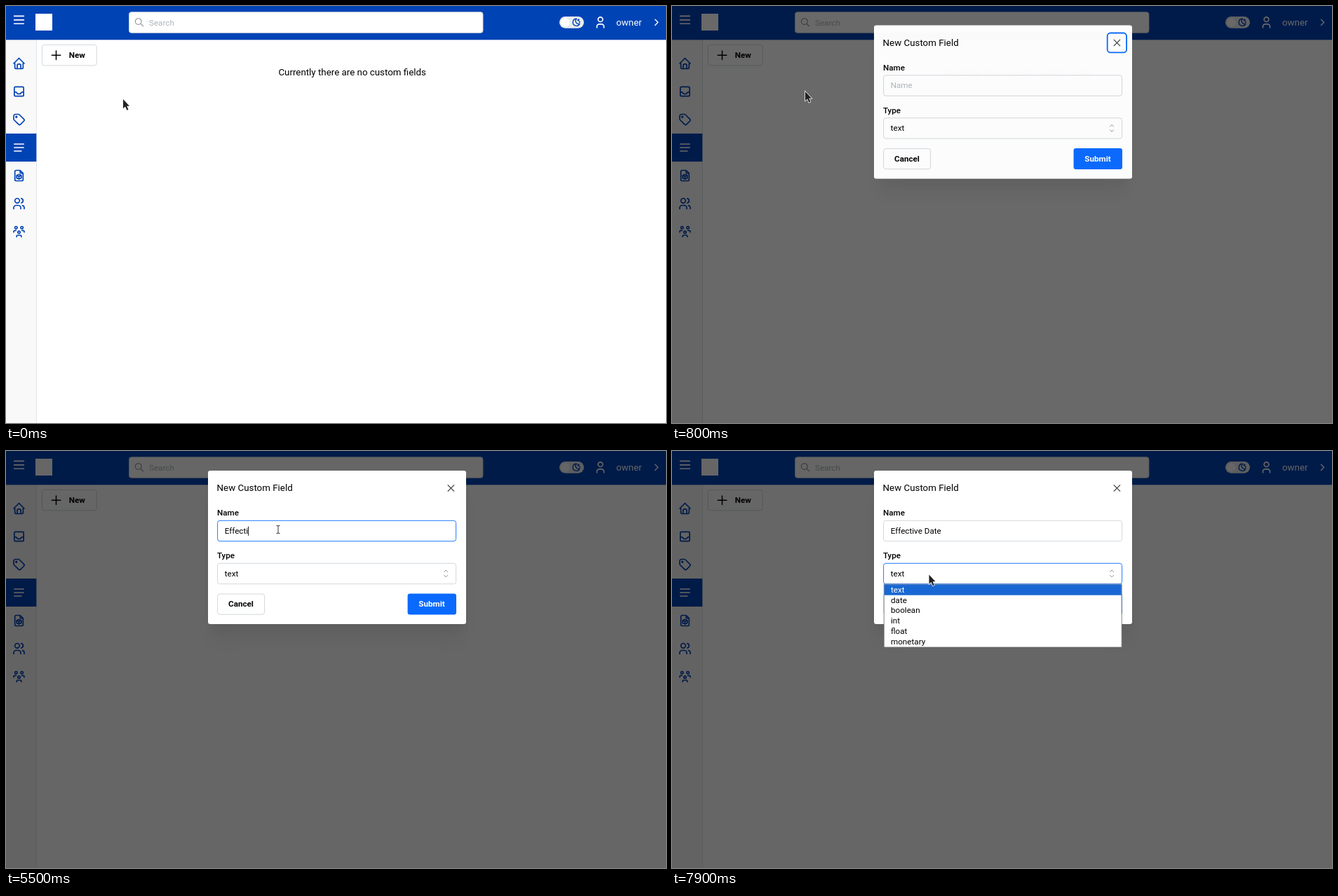
Animation, 941 px wide and 595 px high, one loop 8000 ms. Source, as an HTML page:

```html
<!DOCTYPE html>
<html lang="en">
<head>
<meta charset="utf-8">
<title>New custom field</title>
<style>
  html, body { margin: 0; width: 100%; height: 100%; overflow: hidden; background: #fff; }
  #stage { position: relative; width: 941px; height: 595px; overflow: hidden; }
  #stage > * { position: absolute; left: 0; top: 0; }
  svg { display: block; overflow: visible; font: 11.667px Roboto, sans-serif; }
  text { white-space: pre; }
  .big { font-size: 13.333px; }
  .label { font-weight: 500; }
  .bold { font-weight: 600; }
  .hint { fill: #adb5bd; }
  .center { text-anchor: middle; }
  .box { fill: #fff; stroke: #ced4da; stroke-width: .9; }
  .ring { fill: none; stroke: #0a6aff; stroke-width: 1.8; }
  .icon { fill: none; stroke: #0043b5; stroke-width: 2; stroke-linecap: round; stroke-linejoin: round; }
  .icon.white { stroke: #fff; }
  #overlay { width: 941px; height: 595px; background: #000; }
  #stage > #modal {
    left: 288px; top: 28.3px; width: 367.5px; height: 218.5px; border-radius: 3.3px; background: #fff;
    box-shadow: 0 1px 2.5px rgba(0,0,0,.05), 0 30px 23px -6px rgba(0,0,0,.05), 0 14px 14px -6px rgba(0,0,0,.04);
  }
</style>
</head>
<body>
<div id="stage">
  <svg width="941" height="595">
    <rect y="48" width="43" height="547" fill="#f9f9f9"/>
    <path d="M43.5 48V595" stroke="#dee2e6" stroke-width=".9"/>
    <rect width="941" height="48.3" fill="#0043b5"/>
    <rect y="182" width="43.3" height="40" fill="#0043b5"/>
    <path d="M11 14.4h15M11 19.9h15M11 25.3h15" stroke="#fff" stroke-width="1.6"/>
    <rect x="42" y="11" width="24" height="24" fill="#fff"/>
    <rect class="box" x="175.5" y="8.7" width="504.5" height="29.6" rx="3.3"/>
    <text class="hint" x="204" y="27.5">Search</text>
    <rect x="789" y="15" width="35" height="16.7" rx="8.35" fill="#e9ecef"/>
    <circle cx="797.5" cy="23.3" r="6.2" fill="#fff"/>
    <text class="big" x="870" y="27.8" fill="#fff">owner</text>
    <g id="icons"></g>
    <rect id="newButton" class="box" x="51.4" y="55.4" width="77.8" height="29.5" rx="3.3"/>
    <rect id="newRing" class="ring" x="49.3" y="53" width="82" height="34.2" rx="4.5"/>
    <path d="M71.5 64v12.5M65.3 70.2h12.5" stroke="#000" stroke-width="1.5" stroke-linecap="round"/>
    <text class="bold" x="89.8" y="74.2">New</text>
    <text class="big" x="388.4" y="99.3">Currently there are no custom fields</text>
  </svg>

  <div id="overlay"></div>

  <div id="modal">
    <svg width="367.5" height="218.5" viewBox="288 28.3 367.5 218.5">
      <text class="big" x="300.6" y="57.6">New Custom Field</text>
      <path d="M629.8 48.7l9.2 9.2M639 48.7l-9.2 9.2" stroke="#343a40" stroke-width="1.2"/>
      <rect id="closeRing" class="ring" x="620.7" y="39.3" width="27.4" height="27.9" rx="4.5"/>
      <text class="label" x="301" y="92.6">Name</text>
      <rect id="nameBox" class="box" x="301.6" y="99.6" width="340" height="29.4" rx="3.3"/>
      <text id="hint" class="hint" x="311.7" y="118.3">Name</text>
      <text id="typed" x="311.7" y="118.3"></text>
      <rect id="caret" y="108" width=".9" height="13"/>
      <text class="label" x="301" y="153.6">Type</text>
      <rect id="typeBox" class="box" x="301.6" y="160.6" width="340" height="29.4" rx="3.3"/>
      <text x="311.7" y="179.3">text</text>
      <path d="M624.4 173l2.7-2.7 2.7 2.7M624.4 177.4l2.7 2.7 2.7-2.7" fill="none" stroke="#868e96"/>
      <rect class="box" x="301.6" y="204.3" width="67" height="29.2" rx="3.3"/>
      <text class="bold center" x="335" y="222.8">Cancel</text>
      <rect x="572.6" y="203.8" width="69.4" height="30" rx="3.3" fill="#0a6aff"/>
      <text class="bold center" x="607" y="222.8" fill="#fff">Submit</text>
      <g id="popup">
        <rect x="302.2" y="190.4" width="339" height="89.9" fill="#fff" stroke="#666" stroke-width=".8"/>
        <rect x="302.6" y="190.8" width="338.2" height="15.2" fill="#1967d2"/>
      </g>
    </svg>
  </div>

  <svg id="pointer" width="1" height="1">
    <path id="arrow" d="M0 0V13.2L3 10.5L5.4 15.7L7.5 14.7L5.2 9.7H9Z" fill="#222" stroke="#fff" stroke-width="1.4" paint-order="stroke"/>
    <g id="beam" fill="none">
      <path d="M-2.5 -5.5H-1Q0 -5.5 0 -4.5V4.5Q0 5.5 -1 5.5H-2.5M2.5 -5.5H1Q0 -5.5 0 -4.5M0 4.5Q0 5.5 1 5.5H2.5" stroke="#fff" stroke-width="2"/>
      <path d="M-2.5 -5.5H-1Q0 -5.5 0 -4.5V4.5Q0 5.5 -1 5.5H-2.5M2.5 -5.5H1Q0 -5.5 0 -4.5M0 4.5Q0 5.5 1 5.5H2.5" stroke="#333" stroke-width="1"/>
    </g>
  </svg>
</div>

<script>
const $ = id => document.getElementById(id);
const LOOP = 8000, TICK = 100;
const FOCUS_NAME = 1400, FOCUS_TYPE = 7700, OPEN_POPUP = 7800;
const NAME = "Effective Date";
const KEY_TIMES = [3800, 4100, 4200, 4400, 4600, 5300, 5500, 5700, 5700, 5800, 6000, 6300, 6400, 6500];

// Keyframes: [time, value, ...]
const POINTER = [
  [0, 167, 133], [100, 158, 124], [200, 140, 107], [400, 108, 76], [500, 104, 71], [600, 104, 71],
  [700, 126, 86], [800, 190, 122], [900, 235, 127], [1000, 292, 121], [1100, 360, 114], [1200, 388, 112],
  [7200, 388, 112], [7300, 386, 120], [7500, 371, 164], [7600, 366.5, 176.5]
];
const MODAL = [[600, 0], [700, .57], [800, .98], [900, 1]];

// Icons on a 24 unit grid: centre x, centre y, scale, path, extra class, stroke width
const circle = (x, y, r) => `M${x - r} ${y}a${r} ${r} 0 1 0 ${2 * r} 0a${r} ${r} 0 1 0 ${-2 * r} 0`;
const S = 5 / 6;
const ICONS = [
  [18.5, 82, S, "M5 12H3l9-9 9 9h-2M5 12v7a2 2 0 0 0 2 2h10a2 2 0 0 0 2-2v-7M9 21v-6a2 2 0 0 1 2-2h2a2 2 0 0 1 2 2v6"],
  [18.5, 122, S, "M4 6a2 2 0 0 1 2-2h12a2 2 0 0 1 2 2v12a2 2 0 0 1-2 2H6a2 2 0 0 1-2-2zM4 13h3l3 3h4l3-3h3"],
  [18.5, 162, S, circle(7.5, 7.5, 1) + "M3 6v5.172a2 2 0 0 0 .586 1.414l7.71 7.71a2.41 2.41 0 0 0 3.408 0l5.592-5.592a2.41 2.41 0 0 0 0-3.408l-7.71-7.71a2 2 0 0 0-1.414-.586H6a3 3 0 0 0-3 3z"],
  [18.5, 202, S, "M4 6h16M4 12h16M4 18h12", "white"],
  [18.5, 242, S, "M14 3v4a1 1 0 0 0 1 1h4M17 21H7a2 2 0 0 1-2-2V5a2 2 0 0 1 2-2h7l5 5v11a2 2 0 0 1-2 2zM12 13.5l4-1.5M8 11.85l4 1.65V18l4-1.85v-4.3L12 10zv4.35l4 1.8"],
  [18.5, 282, S, circle(9, 7, 4) + "M3 21v-2a4 4 0 0 1 4-4h4a4 4 0 0 1 4 4v2M16 3.13a4 4 0 0 1 0 7.75M21 21v-2a4 4 0 0 0-3-3.85"],
  [18.5, 322, S, circle(12, 13, 2) + circle(17, 5, 2) + circle(7, 5, 2) + "M8 21v-1a2 2 0 0 1 2-2h4a2 2 0 0 1 2 2v1M17 10h2a2 2 0 0 1 2 2v1M3 13v-1a2 2 0 0 1 2-2h2"],
  [847.5, 23.3, S, circle(12, 7, 4) + "M6 21v-2a4 4 0 0 1 4-4h4a4 4 0 0 1 4 4v2", "white"],
  [927.5, 23.3, .69, "M9 6l6 6-6 6", "white"],
  [190, 23.3, .625, circle(10, 10, 7) + "M21 21l-6-6", "gray", 1.7],
  [813.3, 23.3, .556, "M12 3h.4a7.5 7.5 0 0 0 7.9 12.45A9 9 0 1 1 12 3M17 4a2 2 0 0 0 2 2 2 2 0 0 0-2 2 2 2 0 0 0-2-2 2 2 0 0 0 2-2M19 11h2M20 10v2", "", 2.5]
];
$("icons").innerHTML = ICONS.map(([x, y, scale, d, kind = "", width = 2]) =>
  `<path class="icon ${kind}" transform="translate(${x} ${y}) scale(${scale}) translate(-12 -12)" d="${d}"
    style="stroke-width:${width}${kind === "gray" ? ";stroke:#868e96" : ""}"/>`).join("");

$("popup").innerHTML += ["text", "date", "boolean", "int", "float", "monetary"].map((option, i) =>
  `<text x="312" y="${202 + i * 14.85}" fill="${i ? "#000" : "#fff"}">${option}</text>`).join("");

function sample(keys, t) {
  const next = keys.findIndex(key => key[0] > t);
  if (next === 0) return keys[0].slice(1);
  if (next < 0) return keys[keys.length - 1].slice(1);
  const a = keys[next - 1], b = keys[next], k = (t - a[0]) / (b[0] - a[0]);
  return a.slice(1).map((v, i) => v + (b[i + 1] - v) * k);
}

const show = (id, on) => { $(id).style.display = on ? "" : "none"; };
const focusRamp = (t, start) => Math.min(1, Math.max(0, (t - start + TICK) / (3 * TICK)));

function setBorder(id, k) {
  const mix = (from, to) => from + (to - from) * k;
  $(id).style.stroke = `rgb(${mix(206, 10)},${mix(212, 106)},${mix(218, 255)})`;
}

function render(t) {
  const [x, y] = sample(POINTER, t);
  const overInput = x > 301 && y > 99 && y < 129;
  $("pointer").style.transform = `translate(${x}px,${y}px)`;
  show("arrow", !overInput);
  show("beam", overInput);

  const [open] = sample(MODAL, t);
  $("overlay").style.opacity = .6 * open;
  $("modal").style.opacity = open;
  $("modal").style.transform = open < 1 ? `translateY(${-25 * (1 - open)}px)` : "none";

  $("newButton").style.fill = t <= 600 && x < 129 && y < 85 ? "#f8f9fa" : "#fff";
  show("newRing", t === 600);
  show("closeRing", t < FOCUS_NAME);

  const count = KEY_TIMES.filter(time => time <= t).length;
  $("typed").textContent = NAME.slice(0, count);
  show("hint", !count);
  const lastInput = count ? KEY_TIMES[count - 1] : FOCUS_NAME;
  show("caret", t >= FOCUS_NAME && t < FOCUS_TYPE && (t - lastInput) % 1200 < 600);
  $("caret").setAttribute("x", 311.7 + (count ? $("typed").getComputedTextLength() : 0));

  const typeFocus = focusRamp(t, FOCUS_TYPE);
  setBorder("nameBox", focusRamp(t, FOCUS_NAME) - typeFocus);
  setBorder("typeBox", typeFocus);
  show("popup", t >= OPEN_POPUP);
}

// The screen updates ten times a second.
function frame() {
  render(Math.floor(performance.now() % LOOP / TICK) * TICK);
  requestAnimationFrame(frame);
}
frame();
</script>
</body>
</html>
```
